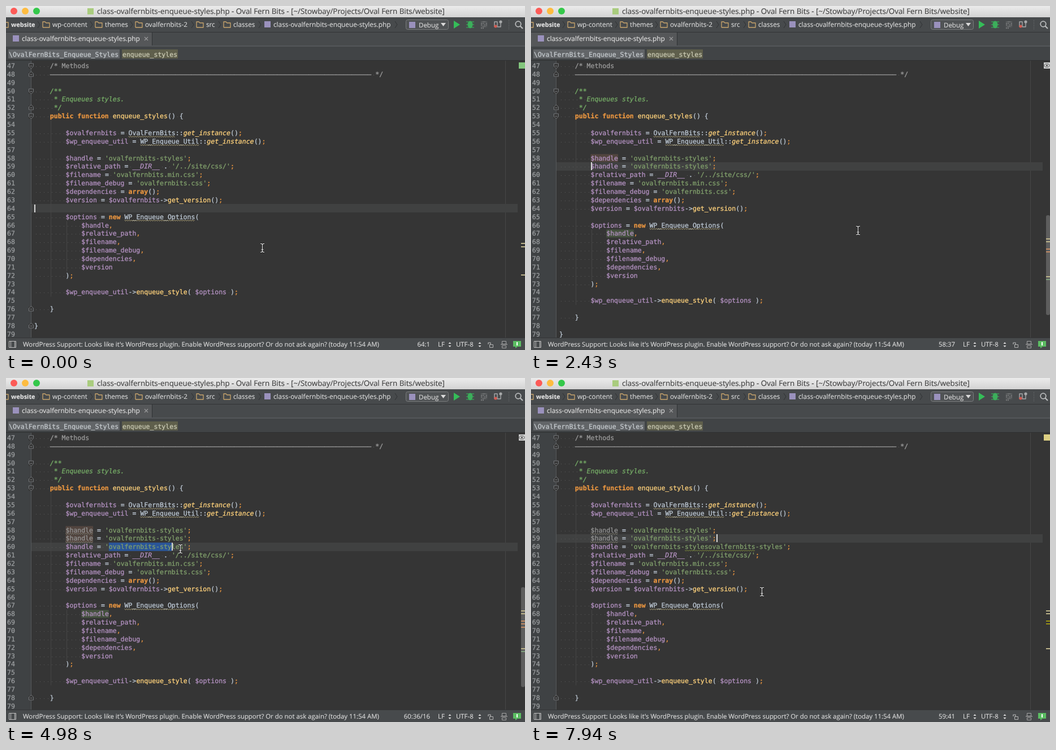
An HTML page with a canvas for the animation above (8000 ms loop, 918 by 610 pixels).

```html
<!DOCTYPE html>
<html lang="en">
<head>
<meta charset="utf-8">
<title>Editor</title>
<style>
html, body { margin: 0; width: 918px; height: 610px; overflow: hidden; background: #353535; }
canvas { display: block; }
</style>
</head>
<body>
<canvas id="stage" width="918" height="610"></canvas>
<script>
const g = document.getElementById('stage').getContext('2d');
const LOOP = 8000, CW = 6.94, LH = 14.87, X0 = 50;
const MONO = '"DejaVu Sans Mono", monospace', UI = '"Open Sans", "Noto Sans", sans-serif';
const C = {
  text: '#bdc8d4', key: '#e69440', name: '#b492c2', str: '#81a06c', call: '#ffd27c',
  doc: '#76ad67', note: '#9a9a9a', dim: '#949494', chrome: '#474a4c', ui: '#dadada'
};
const RULE = '—'.repeat(82);
const HANDLE = "        $handle = 'ovalfernbits-styles';";
const LINES = `    /* Methods
    ${RULE} */

    /**
     * Enqueues styles.
     */
    public function enqueue_styles() {

        $ovalfernbits = OvalFernBits::get_instance();
        $wp_enqueue_util = WP_Enqueue_Util::get_instance();

${HANDLE}
        $relative_path = __DIR__ . '/../site/css/';
        $filename = 'ovalfernbits.min.css';
        $filename_debug = 'ovalfernbits.css';
        $dependencies = array();
        $version = $ovalfernbits->get_version();

        $options = new WP_Enqueue_Options(
            $handle,
            $relative_path,
            $filename,
            $filename_debug,
            $dependencies,
            $version
        );

        $wp_enqueue_util->enqueue_style( $options );

    }

}
`.split('\n');

// Syntax rules, tried in order at each position
const RULES = [
  [/^'[^']*'/, C.str], [/^\$\w+/, C.name], [/^(public|function|new|array)\b/, C.key, 'bold'],
  [/^__DIR__/, C.name, 'italic'], [/^get_instance/, C.call, 'italic'],
  [/^(enqueue_styles?|get_version)/, C.call], [/^[;,]/, C.key],
  [/^(OvalFernBits|WP_Enqueue_\w+)/, C.text, '', true], [/^(\w+|\S)/, C.text]
];

// Mouse path: time, x, y
const PATH = [
  [30, 453, 429], [480, 330, 217], [930, 302, 269], [1230, 302, 269], [1680, 578, 398],
  [2580, 578, 398], [2880, 377, 318], [3480, 190, 300], [3780, 185, 299], [4380, 183, 301],
  [4980, 308, 303], [5110, 316, 303], [5410, 312, 303], [6460, 312, 303], [7060, 420, 284],
  [7360, 420, 284], [7940, 408, 379]
];
const CARET = [[-200, 64, 0], [1230, 58, 36], [2430, 59, 8], [2730, 60, 8], [4380, 60, 19], [6010, 60, 57], [7360, 59, 40]];
const PLACE = [[-200, '64:1'], [1380, '58:37'], [2730, '59:9'], [3030, '60:9'], [4530, ''], [6460, '60:58/19'], [7510, '59:41']];
const BADGE = [[-200, '#83c77d'], [2430, '#cfd0d0', 1], [3480, '#d9cf86', 1], [4380, '#cfd0d0', 1], [6010, '#d9cf86', 1], [7360, '#dccf82']];

const at = (list, t) => list.filter(k => k[0] <= t).pop();
const lineY = n => 106 + (n - 47) * LH;
const colX = c => X0 + c * CW;

function box(x, y, w, h, color) { g.fillStyle = color; g.fillRect(x, y, w, h); }
function frame(x, y, w, h, color) { g.strokeStyle = color; g.lineWidth = 1; g.strokeRect(x + .5, y + .5, w, h); }
function disc(x, y, r, color) { g.fillStyle = color; g.beginPath(); g.arc(x, y, r, 0, 7); g.fill(); }
function line(color, width, ...p) {
  g.strokeStyle = color; g.lineWidth = width; g.beginPath();
  for (let i = 0; i < p.length; i += 2) g.lineTo(p[i], p[i + 1]);
  g.stroke();
}
function poly(color, ...p) {
  g.fillStyle = color; g.beginPath();
  for (let i = 0; i < p.length; i += 2) g.lineTo(p[i], p[i + 1]);
  g.fill();
}
// A hairline stroke gives the fuller weight of smoothed type
function type(s, x, y, font, color, weight) {
  g.font = font; g.fillStyle = g.strokeStyle = color;
  g.lineWidth = weight; g.lineJoin = 'round';
  g.fillText(s, x, y); g.strokeText(s, x, y);
}
function label(s, x, y, size, color = C.ui, style = '', align = 'left') {
  g.textAlign = align;
  type(s, x, y, `${style} ${size}px ${UI}`, color, .15);
  g.textAlign = 'left';
}
function mono(s, x, y, color, style = '') {
  type(s, x, y + 4, `${style} 11.53px ${MONO}`, color, .3);
}
function wave(x, y, w, color) {
  const p = [];
  for (let i = 0; i <= w; i += 2) p.push(x + i, y + (i % 4 ? 1.6 : 0));
  line(color, 1, ...p);
}
function folder(x) {
  line('#c9a56c', 1.3, x + 1, 38, x + 1, 28, x + 5, 28, x + 7, 30, x + 13, 30, x + 13, 38, x + 1, 38);
}
function chevron(x) { line('#303234', 1, x, 27, x + 4, 33, x, 39); }
function spinner(x) {
  poly(C.ui, x - 2.5, 599, x, 596, x + 2.5, 599);
  poly(C.ui, x - 2.5, 602, x, 605, x + 2.5, 602);
}

function titleBar() {
  const shade = g.createLinearGradient(0, 0, 0, 20);
  shade.addColorStop(0, '#ebebeb'); shade.addColorStop(1, '#d3d3d3');
  box(0, 0, 918, 20, shade);
  ['#fc5b57', '#fdbc40', '#34c84a'].forEach((c, i) => disc(14 + i * 20, 9, 6, c));
  box(144, 4, 11, 11, '#a9cc7e');
  label('class-ovalfernbits-enqueue-styles.php - Oval Fern Bits - [~/Stowbay/Projects/Oval Fern Bits/website]', 161, 14, 13.35, '#424242');
}

function toolbar() {
  box(0, 20, 918, 77, C.chrome);
  box(0, 46, 918, 1, '#323436');
  line('#c9a56c', 1.3, 0, 29, 4, 29, 4, 38, 0, 38);
  label('website', 9, 37, 10.9, '#e2e2e2', 'bold');
  [[64, 'wp-content'], [157, 'themes'], [228, 'ovalfernbits-2'], [336, 'src'], [384, 'classes']].forEach(([x, s]) => {
    folder(x); label(s, x + 18, 37, 11.7);
  });
  [56, 149, 220, 328, 376, 447, 688].forEach(chevron);
  box(457, 27, 11, 11, '#9a91bd');
  label('class-ovalfernbits-enqueue-styles.php', 473, 37, 11.8);

  g.fillStyle = '#505355'; g.strokeStyle = '#7a7c7d'; g.lineWidth = 1;
  g.beginPath(); g.roundRect(707.5, 24.5, 75, 17, 3); g.fill(); g.stroke();
  box(713, 28, 11, 11, '#9a91bd');
  label('Debug', 730, 38, 11.5);
  poly(C.ui, 769, 30, 778, 30, 773.5, 36);
  poly('#35bd58', 792, 26, 803, 33, 792, 40);
  for (const y of [28, 33, 38]) line('#35a854', 1.3, 814, y, 828, y);
  g.fillStyle = '#3cae5b'; g.beginPath(); g.ellipse(821, 33, 4.5, 6.5, 0, 0, 7); g.fill();
  for (let i = 0; i < 18; i++) box(840 + i % 4 * 3, 27 + (i >> 2) * 2.8, 2, 2, i % 3 ? '#7b7d7e' : '#5d6061');
  line('#a7a9aa', 1.4, 864, 37, 864, 28, 869, 28, 869, 37, 875, 37, 875, 28);
  disc(866, 36, 2.6, '#d35b52'); disc(875, 28, 2.6, '#a7a9aa');
  for (let y = 25; y < 42; y += 3) box(889, y, 1, 1, '#77797a');
  g.strokeStyle = '#b9bbbc'; g.lineWidth = 1.8; g.beginPath(); g.arc(906, 32, 4.8, 0, 7); g.stroke();
  line('#b9bbbc', 2.2, 909.5, 35.5, 914, 40);

  box(0, 47, 258, 23, '#555759');
  box(258, 47, 1, 23, '#303234');
  box(0, 70, 918, 2, '#54575a');
  box(12, 52, 11, 11, '#9a91bd');
  label('class-ovalfernbits-enqueue-styles.php', 28, 62, 11.88, '#e2e2e2');
  line('#979899', 1.2, 245, 55, 251, 61); line('#979899', 1.2, 251, 55, 245, 61);

  box(0, 72, 918, 25, '#414446');
  box(4, 77, 197, 16, '#626568');
  box(205, 77, 99, 16, '#5f5f4c');
  mono('\\OvalFernBits_Enqueue_Styles', 5, 85.5, '#c4c9cd');
  mono('enqueue_styles', 206, 85.5, '#c9c9b2');
  box(0, 96, 918, 1, '#2e3031');
}

function statusBar(place) {
  box(0, 588, 918, 22, C.chrome);
  box(0, 588, 918, 1, '#333536');
  frame(5, 594, 12, 11, '#c0c0c0');
  box(8, 595, 1, 10, '#c0c0c0'); box(15, 595, 1, 10, '#c0c0c0');
  label("WordPress Support: Looks like it's WordPress plugin. Enable WordPress support? Or do not ask again? (today 11:54 AM)", 30, 604, 11.4);
  label(place, 750, 604, 11.4, C.ui, '', 'right');
  label('LF', 764, 604, 11.4); spinner(785);
  label('UTF-8', 796, 604, 11.4); spinner(838);
  frame(855, 600, 6, 5, '#b5b5b5');
  line('#b5b5b5', 1.2, 853, 600, 853, 597, 857, 597, 857, 600);
  frame(877, 594, 7, 5, '#a5a5a5');
  line('#a5a5a5', 1.2, 875, 600, 887, 600);
  frame(877, 602, 7, 4, '#a5a5a5');
  poly('#5bbd62', 897, 594, 911, 594, 911, 604, 905, 604, 901, 607, 901, 604, 897, 604);
  box(903, 596, 2, 6, '#fff');
}

function fold(n) {
  const y = Math.round(lineY(n));
  box(40, y - 4, 9, 9, '#353535');
  const up = [48, 52, 76, 78].includes(n) ? -1 : 1;
  line('#74777a', 1, 40.5, y - 4 * up, 48.5, y - 4 * up, 48.5, y + 1 * up, 44.5, y + 5 * up, 40.5, y + 1 * up, 40.5, y - 4 * up);
  line('#74777a', 1, 42.5, y + .5, 46.5, y + .5);
}

function codeLine(s, n, gray) {
  const y = lineY(n), indent = s.search(/\S/);
  for (let c = 0; c < s.length; c++) if (s[c] === ' ') box(Math.round(colX(c + .5)), Math.round(y) + 1, 1, 1, '#5a5a5a');
  if (n < 53) {
    const isDoc = n > 49;
    if (s) mono(s.slice(indent), colX(indent), y, isDoc ? C.doc : C.note, isDoc ? 'italic' : '');
    return;
  }
  for (let c = 0; c < s.length;) {
    const rest = s.slice(c);
    if (rest[0] === ' ') { c++; continue; }
    const [re, color, style, wavy] = RULES.find(r => r[0].test(rest));
    const word = rest.match(re)[0], dull = gray && word === '$handle';
    mono(word, colX(c), y, dull ? C.dim : color, style);
    if (wavy || dull) wave(colX(c), y + 6, word.length * CW, dull ? '#8f8b7c' : '#b3a77c');
    c += word.length;
  }
}

function marks(t) {
  const dup = t >= 2430, busy = dup && t < 6010;
  if (busy) { g.fillStyle = '#5d5d5d'; g.beginPath(); g.roundRect(911, 371, 7, 177, 3); g.fill(); }
  const put = (color, ...ys) => ys.forEach(y => box(911, y, 7, 2, color));
  if (!dup) put('#bdb48a', 420, 426, 476);
  else {
    put('#bdb48a', 412, 417, 479);
    if (busy) {
      put('#c08a64', 430, 435); put('#7fa07c', 484);
      if (t >= 3480) put('#c08a64', 441);
    } else put('#9c9415', 430, 435);
  }
  const [, color, eye] = at(BADGE, t);
  box(907, 100, 11, 11, color);
  if (eye) {
    g.strokeStyle = '#555'; g.lineWidth = 1; g.beginPath(); g.ellipse(912.5, 105.5, 4.5, 3, 0, 0, 7); g.stroke();
    disc(912.5, 105.5, 1.5, '#444');
  }
}

function pointer(t) {
  let i = PATH.findIndex(k => k[0] > t);
  if (i < 0) i = PATH.length;
  const a = PATH[Math.max(0, i - 1)], b = PATH[Math.min(i, PATH.length - 1)];
  const u = b[0] > a[0] ? (t - a[0]) / (b[0] - a[0]) : 0;
  const x = Math.round(a[1] + (b[1] - a[1]) * u) + .5, y = Math.round(a[2] + (b[2] - a[2]) * u);
  for (const [color, w] of [['#1c1c1c', 2.6], ['#e6e6e6', 1.1]]) {
    for (const side of [-1, 1]) {
      line(color, w, x + 3.5 * side, y - 7.5, x + 1.5 * side, y - 7.5, x, y - 6, x, y + 6, x + 1.5 * side, y + 7.5, x + 3.5 * side, y + 7.5);
    }
    line(color, w, x - 2, y + 3, x + 2, y + 3);
  }
}

function editor(t) {
  const dups = t >= 2730 ? 2 : t >= 2430 ? 1 : 0, long = t >= 6010;
  const lines = LINES.slice();
  lines.splice(12, 0, ...Array(dups).fill(HANDLE));
  if (long) lines[13] = HANDLE.replace('styles', 'stylesovalfernbits-styles');
  let [, row, col] = at(CARET, t), from = 0, picked = 0;
  if (t >= 4380 && t < 6010) {
    picked = Math.min(19, Math.round((t - 4380) / 37.5));
    from = 19; col = 19 + picked;
  } else if (long && t < 7360) { from = 38; picked = 19; }

  box(0, 97, 918, 491, '#353535');
  box(0, 97, 44, 491, '#3f4244');
  box(44, 97, 1, 491, '#56595b');
  box(883, 97, 1, 491, '#464646');
  box(45, Math.round(lineY(row) - 7.5), 860, 15, '#404141');
  box(79, lineY(54) - 7, 1, (21 + dups) * LH, '#454545');
  box(107, lineY(66 + dups) - 7, 1, 6 * LH, '#454545');

  if (dups && !long) {
    for (let n = 58; n < 58 + dups; n++) box(colX(8), lineY(n) - 7, 7 * CW, 14, '#52453f');
    box(colX(12), lineY(66 + dups) - 7, 7 * CW, 14, '#45523f');
  }
  if (picked) box(colX(from), lineY(row) - 7.5, picked * CW, 15, '#2a5598');

  const grayRows = t >= 3480 ? 2 : t >= 2580 ? 1 : 0;
  for (let n = 47; n < 80; n++) {
    mono(String(n), 2, lineY(n), '#9a9d9f');
    codeLine(lines[n - 47], n, n >= 58 && n < 58 + grayRows);
  }
  [47, 48, 50, 52, 53].forEach(fold);
  if (dups !== 1) fold(78);
  if (!dups) fold(76);
  if (t >= 6760) wave(colX(32), lineY(60) + 6, 18 * CW, '#7d8a3c');
  if (t >= 1680 && t < 2430) {
    disc(63, 265, 5, '#f3c05c'); disc(62, 264, 2.5, '#ffe09a');
    box(61, 270, 5, 4, '#b9b9b9');
  }
  const hidden = [[480, 930], [3330, 3630], [4080, 4380]].some(([a, b]) => t >= a && t < b);
  if (!hidden) box(Math.round(colX(col)), Math.round(lineY(row) - 7), 2, 14, '#d8d8d8');
  marks(t);
  return at(PLACE, t)[1] || `60:${col + 1}/${picked}`;
}

function step(t) {
  if (t >= 7940) return 7940;
  const shift = t < 5100 ? 30 : 10;
  return Math.floor((t - shift) / 150) * 150 + shift;
}

const start = performance.now();
function draw(now) {
  const t = step(Math.max(0, now - start) % LOOP);
  g.textRendering = 'geometricPrecision';
  const place = editor(t);
  titleBar();
  toolbar();
  statusBar(place);
  pointer(t);
  requestAnimationFrame(draw);
}
draw(start);
</script>
</body>
</html>
```
